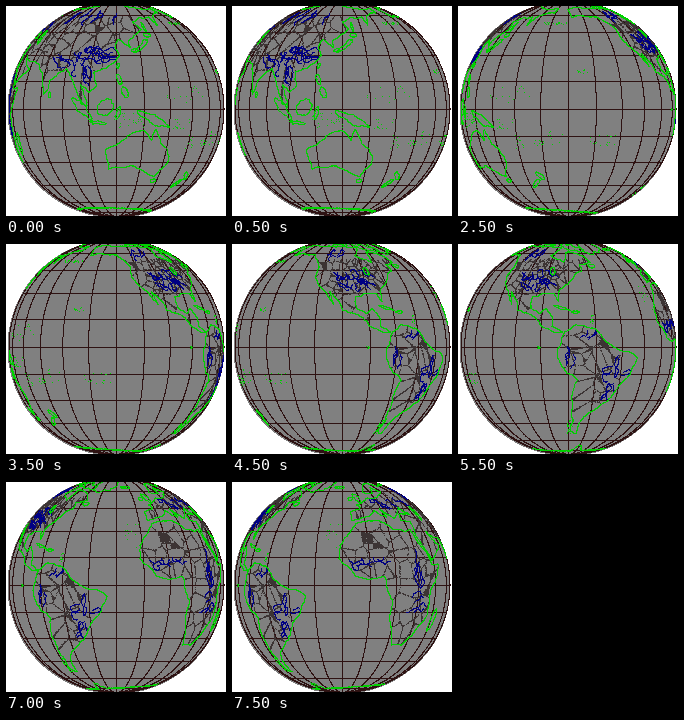
Write a matplotlib script that moves like this. It is 220 px wide and 210 px high and loops after 8 s.

```python
import numpy as np
import matplotlib.pyplot as plt
from matplotlib.animation import FuncAnimation
from matplotlib.patches import Circle
from matplotlib.path import Path

W, H, DPI = 220, 210, 100
CX, CY, R = 110, 103.5, 107.5
FRAMES, STEP, START = 16, 15, 120

rng = np.random.default_rng(4)
layers = {"border": [], "river": [], "coast": []}


def roughen(pts, levels, amp):
    """Close the outline and push each new midpoint sideways at random."""
    for _ in range(levels):
        nxt = np.roll(pts, -1, axis=0)
        side = (nxt - pts)[:, ::-1] * [1, -1]
        mid = (pts + nxt) / 2 + rng.normal(0, amp, (len(pts), 1)) * side
        pts = np.stack([pts, mid], 1).reshape(-1, 2)
    return pts


def land(*flat):
    pts = roughen(np.reshape(flat, (-1, 2)).astype(float), 7, 0.055)
    layers["coast"].append(pts)
    return Path(pts)


def isle(lon, lat, a, b, tilt=0):
    """Rough ellipse, its long axis tilted against the equator."""
    t = np.linspace(0, 2 * np.pi, 10, endpoint=False)
    z = (a * np.cos(t) + 1j * b * np.sin(t)) * np.exp(1j * np.radians(tilt))
    x = lon + z.real / np.cos(np.radians(lat))
    layers["coast"].append(roughen(np.c_[x, lat + z.imag], 4, 0.12))


def specks(n, lon, lat, dlon, dlat):
    layers["coast"].append(rng.uniform(-1, 1, (n, 2)) * [dlon, dlat] + [lon, lat])


def borders(area, count, north=90):
    """Cell edges around random seats inside the area, as dots."""
    low, high = area.get_extents().get_points()
    high[1] = min(high[1], north)
    pts = rng.uniform(low, high, (int(10 * np.prod(high - low)), 2))
    pts = pts[area.contains_points(pts)]
    seats = pts[:count]
    dist = np.hypot(*(pts[:, None] - seats).transpose(2, 0, 1))
    near = np.partition(dist, 1, axis=1)
    layers["border"].append(pts[near[:, 1] - near[:, 0] < 0.3])


def rivers(area, count, lon, lat, dlon, dlat, heading, length=14):
    """Winding walks that keep to a general heading and stay on land."""
    n = int(length / 0.3)
    for _ in range(count):
        bend = np.cumsum(rng.normal(0, 0.3, n))
        angle = np.radians(heading) + bend - bend.mean()
        start = rng.uniform(-1, 1, 2) * [dlon, dlat] + [lon, lat]
        path = start + 0.3 * np.cumsum(np.c_[np.cos(angle), np.sin(angle)], 0)
        layers["river"].append(path[area.contains_points(path)])


africa = land(-6, 35, 10, 37, 20, 31, 32, 31, 37, 20, 43, 11, 51, 11, 40, -3,
              40, -16, 35, -22, 32, -28, 26, -34, 18, -34, 12, -17, 13, -8,
              9, 1, 8, 4.5, -8, 4.5, -17, 14, -16, 22, -10, 30)
south = land(-77, 8, -71, 12, -61, 10, -50, 0, -35, -6, -39, -15, -48, -27,
             -58, -36, -65, -42, -68, -54, -74, -50, -73, -37, -70, -18,
             -76, -14, -81, -5, -79, 2)
north = land(-166, 68, -162, 58, -150, 60, -135, 59, -124, 48, -124, 40,
             -117, 32, -110, 23, -113, 31, -105, 20, -94, 16, -83, 8, -78, 8,
             -84, 11, -84, 16, -88, 21, -91, 18, -97, 21, -97, 28, -84, 30,
             -81, 25, -81, 31, -75, 36, -70, 43, -65, 45, -66, 50, -56, 52,
             -65, 60, -78, 62, -79, 52, -93, 58, -85, 67, -125, 70, -157, 71)
eurasia = land(-9, 37, -9, 43, -1, 46, -4, 48, 8, 54, 20, 55, 30, 60, 22, 65,
               17, 58, 6, 59, 14, 68, 27, 71, 40, 66, 68, 69, 104, 77, 140, 72,
               180, 69, 178, 63, 162, 60, 157, 51, 155, 59, 135, 54, 140, 48,
               128, 39, 129, 35, 126, 37, 121, 40, 119, 35, 122, 30, 114, 22,
               107, 20, 109, 12, 105, 9, 100, 13, 104, 1, 98, 9, 94, 17, 90, 22,
               80, 15, 77, 8, 73, 20, 67, 25, 57, 26, 48, 30, 52, 25, 59, 22,
               44, 13, 35, 28, 36, 36, 28, 37, 29, 41, 41, 41, 33, 46, 23, 38,
               14, 45, 17, 39, 9, 44, 0, 39)
land(114, -22, 115, -34, 124, -33, 131, -32, 138, -35, 147, -39, 153, -31,
     153, -26, 146, -19, 142, -11, 140, -17, 136, -12, 131, -12, 122, -18)
land(131, -1, 141, -3, 150, -10, 141, -9, 133, -4)

# Larger islands: Asia, Oceania, Atlantic
isle(114, 1, 5, 4, 50)
isle(101, 0, 8, 1.6, -47)
isle(110, -7.3, 4.5, 0.7, -8)
isle(121, -2, 3.5, 0.9, 75)
isle(121.5, 16, 3, 1.2, 110)
isle(124.5, 9, 3, 1.6, 110)
isle(137, 36, 6, 1.1, 45)
isle(143, 43.4, 1.9, 1.4)
isle(131.5, 33, 1.8, 1)
isle(143, 50, 3.8, 0.5, 93)
isle(121, 23.7, 1.5, 0.6, 70)
isle(81, 7.6, 1.6, 0.8, 100)
isle(47, -19, 6.7, 2, 74)
isle(147, -42, 1.5, 1.3)
isle(175.5, -38.5, 3.2, 1.3, -50)
isle(170.5, -43.8, 4, 1.1, 48)
isle(-2.5, 54, 4.2, 1.3, 110)
isle(-8, 53.3, 1.6, 1.2, 70)
isle(-19, 65, 2.6, 1.3)
isle(-79, 21.5, 4.8, 0.5, -17)
isle(-71, 19, 2.3, 0.7)
isle(-56, 49, 2, 1.5)
isle(-72, 68, 8, 3, -45)
isle(-109, 71, 4, 2)
isle(-42, 72, 13, 5, 80)
isle(-87, 45, 3, 1.3, 100)
isle(51, 42, 5, 1.5, 105)

# Antarctica: wavy rim with one peninsula
lon = np.arange(-180, 180, 0.4)
rim = -71 + 4 * np.cos(np.radians(lon - 100)) + rng.normal(0, 0.5, lon.size)
layers["coast"].append(np.c_[lon, rim + 9 * np.exp(-((lon + 60) / 6) ** 2)])

# Scattered islets
specks(30, 127, -6, 9, 4)
specks(14, 158, -8, 6, 3)
specks(10, 166, -18, 3, 4)
specks(10, 178, -18, 3, 2)
specks(14, 160, 8, 16, 5)
specks(12, -157, 20.5, 3, 1)
specks(16, -146, -17, 9, 3)
specks(8, -172, -16, 4, 5)
specks(10, -91, -0.5, 1, 0.7)
specks(12, -62, 15, 1, 3)
specks(12, -20, 28, 6, 8)
specks(40, -95, 73, 20, 3)
specks(20, -175, 52.5, 12, 1)
specks(30, -74, -48, 2, 6)

borders(africa, 42)
borders(south, 22)
borders(north, 60, north=55)
borders(eurasia, 60, north=60)

rivers(eurasia, 14, 102, 31, 9, 5, -10)
rivers(eurasia, 7, 99, 24, 4, 4, -75, 10)
rivers(eurasia, 4, 79, 29, 5, 2, -30)
rivers(eurasia, 8, 100, 55, 35, 4, 75)
rivers(eurasia, 8, 28, 51, 20, 4, -40, 9)
rivers(north, 20, -101, 41, 11, 5, -30, 10)
rivers(north, 5, -115, 57, 10, 4, 40, 10)
rivers(south, 4, -75, -10, 2, 3, 80, 9)
rivers(south, 3, -66, 4, 4, 2, 40, 7)
rivers(south, 5, -49, -16, 4, 3, 85, 13)
rivers(south, 4, -51, -18, 4, 3, -110, 12)
rivers(africa, 7, -4, 12, 9, 3, -5, 9)
rivers(africa, 5, 31, 3, 2, 9, 85)
rivers(africa, 5, 27, -11, 5, 6, 20, 9)


def project(lon, lat, lon0):
    """Orthographic view from above the equator, near side only."""
    lam, phi = np.radians(lon - lon0), np.radians(lat)
    near = np.cos(lam) >= 0
    x = CX + R * np.cos(phi) * np.sin(lam)
    y = CY - R * np.sin(phi)
    return x[near], y[near]


fig = plt.figure(figsize=(W / DPI, H / DPI), dpi=DPI, facecolor="white")
ax = fig.add_axes([0, 0, 1, 1])
ax.set(xlim=(0, W), ylim=(H, 0))
ax.axis("off")


def dots(x, y, color):
    return ax.plot(x, y, ",", color=color)[0]


GRID = "#2e1212"
ax.add_patch(Circle((CX, CY), R + 0.5, fc="#808080", lw=0, aa=False))
rim = np.linspace(0, 2 * np.pi, 1500)
dots(CX + R * np.cos(rim), CY + R * np.sin(rim), GRID)

# The view turns by one grid step at a time, so the grid stands still.
arc = np.linspace(-89.9, 89.9, 700)
for deg in range(-75, 90, STEP):
    dots(*project(np.full_like(arc, deg), arc, 0), GRID)
    dots(*project(arc, np.full_like(arc, deg), 0), GRID)

colors = {"border": "#3c3434", "river": "#000084", "coast": "#00d000"}
paths = {k: np.vstack(v).T for k, v in layers.items()}
marks = {k: dots([], [], colors[k]) for k in layers}


def draw(i):
    for k, mark in marks.items():
        mark.set_data(*project(*paths[k], START + STEP * i))
    return list(marks.values())


anim = FuncAnimation(fig, draw, frames=FRAMES, interval=500, repeat=True,
                     repeat_delay=0, blit=False)
plt.show()
```
